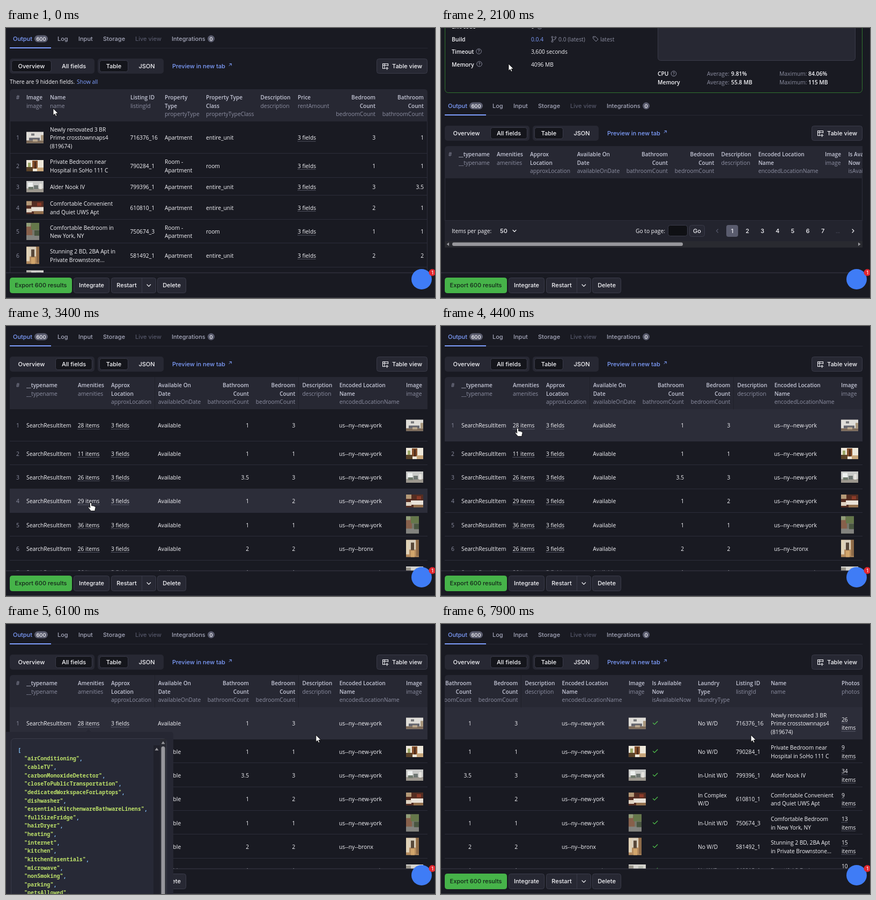
An HTML page for the animation above (8000 ms loop, 800 by 503 pixels).

```html
<!DOCTYPE html>
<html lang="en">
<head>
<meta charset="utf-8">
<title>Dataset table</title>
<style>
  html, body { margin: 0; width: 100%; height: 100%; overflow: hidden; background: #191a22; }
  svg { display: block; width: 800px; height: 503px; }
  text { white-space: pre; }
  .ui { font: 500 11px Inter, sans-serif; }
  .cell { font: 500 10.25px "Open Sans", "Noto Sans", sans-serif; }
  .key { font: 400 10.35px "Open Sans", "Noto Sans", sans-serif; }
  .head { font: 600 10.1px "Open Sans", "Noto Sans", sans-serif; }
  .bold { font: 600 10.3px "Open Sans", "Noto Sans", sans-serif; }
  .code { font: 700 10.08px "Noto Sans Mono", "DejaVu Sans Mono", monospace; }
</style>
</head>
<body>
<svg id="stage" viewBox="0 0 800 503">
  <defs>
    <clipPath id="tableClip"><path d="M7 600V101q0-6 6-6H786V600z"/></clipPath>
    <clipPath id="overviewClip"><path d="M7 600V120q0-6 6-6H780q6 0 6 6V600z"/></clipPath>
    <filter id="soft" x="0" y="0" width="1" height="1"><feGaussianBlur stdDeviation=".7"/></filter>
  </defs>
</svg>
<script>
const C = {
  page: '#191a22', panel: '#272833', line: '#2c2d3a', edge: '#3a3b49', dark: '#14151b',
  white: '#f6f6fa', title: '#c6c8d8', grey: '#8d8fa2', dim: '#555769', badge: '#5a5c6e',
  blue: '#7f9fff', green: '#46b349', hover: '#2c2d39', thumb: '#97979c', code: '#86c8ff'
};
const PERIOD = 8000, LINE = 15.7;
const stage = document.getElementById('stage');

function el(parent, tag, attrs = {}) {
  const node = document.createElementNS('http://www.w3.org/2000/svg', tag);
  for (const key in attrs) node.setAttribute(key, attrs[key]);
  return parent.appendChild(node);
}
const group = (parent, attrs) => el(parent, 'g', attrs);
const rect = (parent, x, y, width, height, fill, rx = 0, stroke = 'none') =>
  el(parent, 'rect', { x, y, width, height, fill, rx, stroke });
const path = (parent, d, stroke, width = 1, fill = 'none') =>
  el(parent, 'path', { d, stroke, fill, 'stroke-width': width, 'stroke-linecap': 'round', 'stroke-linejoin': 'round' });
const circle = (parent, cx, cy, r, fill, stroke = 'none') => el(parent, 'circle', { cx, cy, r, fill, stroke });

// Text is placed by the vertical centre of its capitals.
function label(parent, x, cy, str, cls = 'cell', fill = C.white, anchor = 'start') {
  const node = el(parent, 'text', { x, y: cy + 3.9, class: cls, fill, 'text-anchor': anchor });
  node.textContent = str;
  return node;
}
function lines(parent, x, cy, list, draw = label) {
  list.forEach((str, i) => draw(parent, x, cy + (i - (list.length - 1) / 2) * LINE, str));
}
function link(parent, x, cy, str) {
  const width = label(parent, x, cy, str).getComputedTextLength();
  el(parent, 'path', { d: `M${x} ${cy + 6.5}h${width}`, stroke: '#85879a', 'stroke-dasharray': '1 1' });
}
function header(parent, top, [x, titles, key, anchor]) {
  titles.forEach((str, i) => label(parent, x, top + 15 + i * LINE, str, 'head', C.title, anchor));
  label(parent, x, top + 15 + titles.length * LINE, key, 'key', C.grey, anchor);
}
function button(parent, x, y, w, h, str, fill = C.panel, edge = C.edge, color = C.white) {
  rect(parent, x + .5, y + .5, w - 1, h - 1, fill, 4, edge);
  if (str) label(parent, x + w / 2, y + h / 2, str, 'ui', color, 'middle');
}
function help(parent, x, y) {
  circle(parent, x, y, 4.8, 'none', C.grey);
  el(parent, 'text', { x, y: y + 2.8, 'text-anchor': 'middle', fill: C.grey, style: 'font:600 7.5px Inter,sans-serif' }).textContent = '?';
}

// Thumbnails: [width, height, base colour, ...[x, y, w, h, colour]]
const thumbs = [
  [32, 21, '#dfddd8', [0, 16, 32, 5, '#7d6a58'], [9, 3, 6, 4, '#77787a'], [5, 11, 20, 5, '#63646c'], [12, 14, 9, 4, '#b9a78e'], [27, 6, 5, 10, '#a8967c']],
  [32, 21, '#eee8da', [11, 1, 10, 15, '#84502c'], [0, 13, 12, 8, '#5a4228'], [3, 5, 5, 8, '#9da867'], [20, 14, 12, 7, '#c8a67a'], [15, 3, 3, 13, '#4c2c1c']],
  [32, 21, '#c9cac8', [0, 14, 32, 7, '#9c978e'], [3, 3, 9, 8, '#edf0ef'], [14, 8, 8, 7, '#6f7773'], [24, 5, 5, 10, '#e7e5df'], [4, 11, 9, 5, '#707a6d']],
  [32, 24, '#542d22', [0, 0, 10, 8, '#b59a78'], [9, 11, 23, 8, '#e9e2d8'], [0, 14, 10, 7, '#dfd2c1'], [20, 3, 8, 6, '#8b3a28'], [14, 19, 18, 5, '#93704d']],
  [24, 32, '#75766a', [0, 4, 11, 20, '#87604b'], [9, 0, 15, 13, '#65774a'], [0, 0, 8, 7, '#929e79'], [0, 23, 24, 9, '#83837f'], [15, 14, 9, 10, '#495640']],
  [24, 32, '#b48b5e', [6, 0, 12, 18, '#d9cfbd'], [9, 5, 6, 14, '#58483a'], [0, 0, 6, 27, '#e0d2b7'], [19, 0, 5, 30, '#8d6a48'], [9, 20, 7, 12, '#d2a66c']],
  [32, 21, '#d5d4cf', [0, 2, 9, 12, '#99958c'], [18, 3, 9, 5, '#b9bcb3'], [0, 14, 32, 7, '#8c765e']]
];
function thumb(parent, x, cy, index) {
  const [w, h, base, ...parts] = thumbs[index];
  const g = group(parent, { transform: `translate(${x} ${cy - h / 2 - .5})` });
  rect(g, 0, 0, w, h, base);
  const details = group(g, { filter: 'url(#soft)' });
  parts.forEach(part => rect(details, ...part));
}

const names = [
  ['Newly renovated 3 BR', 'Prime crosstownnaps4', '(819674)'],
  ['Private Bedroom near', 'Hospital in SoHo 111 C'],
  ['Alder Nook IV'],
  ['Comfortable Convenient', 'and Quiet UWS Apt'],
  ['Comfortable Bedroom in', 'New York, NY'],
  ['Stunning 2 BD, 2BA Apt in', 'Private Brownstone...'],
  ['Beautiful 2 Bedroom']
];
const narrowNames = [...names];
narrowNames[4] = ['Comfortable Bedroom', 'in New York, NY'];
narrowNames[5] = ['Stunning 2 BD, 2BA Apt', 'in Private Brownstone...'];
const ids = ['716376_16', '790284_1', '799396_1', '610810_1', '750674_3', '581492_1', '640215_1'];
const beds = [3, 1, 3, 2, 1, 2, 1], baths = [1, 1, 3.5, 1, 1, 2, 1];
const amenities = [28, 11, 26, 29, 36, 26, 26], photos = [26, 9, 34, 9, 13, 15, 10];
const laundry = [['No W/D'], ['No W/D'], ['In-Unit W/D'], ['In Complex', 'W/D'], ['In-Unit W/D'], ['No W/D'], ['No W/D']];
const isRoom = i => i === 1 || i === 4;

// Page content, which scrolls vertically
const page = group(stage);

function buildRunInfo(g) {
  rect(g, 7.5, -200, 778, 195.5, C.page, 6, '#31752f');
  rect(g, 404.5, -200, 368, 135.5, C.panel, 5, C.edge);
  ['Exit code', 'Build', 'Timeout', 'Memory'].forEach((str, i) => label(g, 20, -127.5 + i * 23.5, str, 'bold'));
  label(g, 168, -127.5, '0');
  help(g, 184, -128);
  label(g, 168, -104, '0.0.4', 'cell', C.blue);
  path(g, 'M207.5 -107v6M207.5 -103h4q2 0 2-3', C.grey);
  [[207.5, -108], [207.5, -100], [213.5, -107.5]].forEach(p => circle(g, ...p, 1.5, C.page, C.grey));
  label(g, 219, -104, '0.0 (latest)', 'key', C.grey);
  path(g, 'M284 -109h4l5 5-4 4-5-5zM286 -107h.2', C.grey);
  label(g, 297, -104, 'latest', 'key', C.grey);
  label(g, 168, -81, '3,600 seconds');
  label(g, 168, -57, '4096 MB');
  help(g, 70.5, -81.5);
  help(g, 71.5, -58);
  help(g, 434, -40);
  [['CPU', '9.81%', '84.06%'], ['Memory', '55.8 MB', '115 MB']].forEach(([name, avg, max], i) => {
    const y = -39.5 + i * LINE;
    label(g, 404, y, name, 'bold');
    label(g, 496, y, 'Average:', 'key', C.grey);
    label(g, 541, y, avg, 'bold');
    label(g, 631, y, 'Maximum:', 'key', C.grey);
    label(g, 685, y, max, 'bold');
  });
}

function buildTabs(g) {
  path(g, 'M7 37.5H786', C.panel);
  rect(g, 7, 36, 77, 2, C.blue);
  [[13, 'Output', C.blue], [96, 'Log'], [135, 'Input'], [181, 'Storage'], [241, 'Live view', C.dim], [309, 'Integrations']]
    .forEach(([x, str, fill = '#a6a8bb']) => label(g, x, 20, str, 'ui', fill));
  rect(g, 53, 13.5, 25, 13, C.badge, 6.5);
  rect(g, 376, 13.5, 13, 13, C.badge, 6.5);
  [[65.5, '600'], [382.5, '0']].forEach(([x, str]) =>
    label(g, x, 19.7, str, 'ui', C.white, 'middle').style.fontSize = '9.5px');
}

function buildToolbar(g) {
  rect(g, 7, 57, 158, 28, C.panel, 5);
  rect(g, 171, 57, 123, 28, C.panel, 5);
  const active = rect(g, 10.5, 60.5, 74, 21, C.dark, 4, C.edge);
  rect(g, 174.5, 60.5, 53, 21, C.dark, 4, C.edge);
  [[47.5, 'Overview'], [126.5, 'All fields'], [201, 'Table'], [262.5, 'JSON']]
    .forEach(([x, str]) => label(g, x, 71, str, 'ui', C.white, 'middle'));
  label(g, 310, 71, 'Preview in new tab', 'ui', C.blue);
  path(g, 'M416 70.5l4-4M417 66.5h3.3v3.3', C.blue);
  button(g, 691, 57, 95, 28);
  path(g, 'M707 75.5h-4.5v-9h10v4M702.5 69.5h10M706 66.5v9M710.5 72.5v5M708 75h5', C.white, 1.1);
  label(g, 720, 71, 'Table view', 'ui');
  return active;
}

function buildOverview(g) {
  label(g, 7, 100, 'There are 9 hidden fields.');
  label(g, 132, 100, 'Show all', 'cell', C.blue);
  const t = group(g, { 'clip-path': 'url(#overviewClip)' });
  rect(t, 7, 114, 779, 60, C.panel);
  label(t, 22, 129, '#', 'key', C.grey, 'middle');
  [
    [38, ['Image'], 'image'], [82, ['Name'], 'name'], [232, ['Listing ID'], 'listingId'],
    [296, ['Property', 'Type'], 'propertyType'], [373, ['Property Type', 'Class'], 'propertyTypeClass'],
    [474.5, ['Description'], 'description'], [544, ['Price'], 'rentAmount'],
    [689, ['Bedroom', 'Count'], 'bedroomCount', 'end'], [779, ['Bathroom', 'Count'], 'bathroomCount', 'end']
  ].forEach(col => header(t, 114, col));
  const centres = [204.5, 257, 296, 335, 379.5, 424, 462.5];
  const ends = [233.5, 278.5, 311.5, 356.5, 400.5, 445.5, 479.5];
  centres.forEach((y, i) => {
    path(t, `M7 ${ends[i]}H786`, C.line);
    label(t, 22, y, i + 1, 'key', C.grey, 'middle');
    thumb(t, 38, y, i);
    lines(t, 82, y, names[i]);
    label(t, 231.5, y, ids[i]);
    lines(t, 296, y, isRoom(i) ? ['Room -', 'Apartment'] : ['Apartment']);
    label(t, 373, y, isRoom(i) ? 'room' : 'entire_unit');
    link(t, 544, y, '3 fields');
    label(t, 689, y, beds[i], 'cell', C.white, 'end');
    label(t, 779, y, baths[i], 'cell', C.white, 'end');
  });
  path(t, 'M7.5 174V460M785.5 174V460', C.line);
}

const columns = [
  [134, ['Amenities'], 'amenities'], [196, ['Approx', 'Location'], 'approxLocation'],
  [283.7, ['Available On', 'Date'], 'availableOnDate'], [453, ['Bathroom', 'Count'], 'bathroomCount', 'end'],
  [539.5, ['Bedroom', 'Count'], 'bedroomCount', 'end'], [552.5, ['Description'], 'description'],
  [621.7, ['Encoded Location', 'Name'], 'encodedLocationName'], [746, ['Image'], 'image'],
  [789.5, ['Is Available', 'Now'], 'isAvailableNow'], [875, ['Laundry', 'Type'], 'laundryType'],
  [946, ['Listing ID'], 'listingId'], [1011, ['Name'], 'name'], [1143, ['Photos'], 'photos']
];

function buildLoading(g) {
  const t = group(g, { 'clip-path': 'url(#tableClip)' });
  rect(t, 7, 95, 779, 60, C.panel);
  label(t, 17, 110, '#', 'key', C.grey, 'middle');
  header(t, 95, [33, ['__typename'], '__typename']);
  columns.forEach(([x, ...rest]) => header(t, 95, [x - 30, ...rest]));
  rect(g, 7, 233, 779, 39, '#23242e');
  path(g, 'M7 233.5H786M7.5 155V233M785.5 155V233', C.line);
  label(g, 20, 253, 'Items per page:');
  label(g, 110, 253, '50', 'ui');
  path(g, 'M134 251.5l3 3 3-3', C.white, 1.2);
  label(g, 363, 253, 'Go to page:');
  rect(g, 423.5, 242.5, 36, 20, '#0f1014', 4, C.edge);
  button(g, 463, 242, 29, 22, 'Go');
  path(g, 'M516.5 250l-3 3 3 3', C.dim, 1.2);
  rect(g, 532, 242, 22, 22, C.badge, 4);
  for (let n = 1; n <= 7; n++) label(g, 515 + n * 28.15, 253, n, 'ui', C.white, 'middle');
  label(g, 740, 253, '...', 'cell', C.dim, 'middle');
  path(g, 'M767 250l3 3-3 3', C.white, 1.2);
  rect(g, 7, 272, 779, 12, '#292a30');
  rect(g, 21, 274.5, 430, 6.5, C.thumb, 3);
  path(g, 'M15 274.5v6.5l-4.5-3.2z', 'none', 0, C.thumb);
  path(g, 'M778 274.5v6.5l4.5-3.2z', 'none', 0, C.thumb);
}

const rowEdges = [155, 215, 259, 304, 348, 392, 437, 481];
const rowCentres = [185.5, 238, 282, 326.5, 371, 415, 459];

function buildFull(g) {
  const t = group(g, { 'clip-path': 'url(#tableClip)' });
  rect(t, 7, 95, 779, 60, C.panel);
  const hover = rect(t, 7, 0, 779, 0, C.hover);
  rowEdges.slice(1).forEach(y => path(t, `M7 ${y - .5}H786`, C.line));
  const wide = group(t);
  path(wide, 'M277.5 95V155M545.5 95V155', '#20212a');
  label(wide, 22, 110, '#', 'key', C.grey, 'middle');
  header(wide, 95, [38, ['__typename'], '__typename']);
  columns.forEach(col => header(wide, 95, col));
  rowCentres.forEach((y, i) => {
    label(wide, 22, y, i + 1, 'key', C.grey, 'middle');
    label(wide, 38, y, 'SearchResultItem');
    link(wide, 133.7, y, amenities[i] + ' items');
    link(wide, 196, y, '3 fields');
    label(wide, 283.3, y, 'Available');
    label(wide, 453, y, baths[i], 'cell', C.white, 'end');
    label(wide, 539.3, y, beds[i], 'cell', C.white, 'end');
    label(wide, 621, y, i === 5 ? 'us--ny--bronx' : 'us--ny--new-york');
    thumb(wide, 746, y, i);
    path(wide, `M791.5 ${y - 1}l2.7 2.6 5.6-5.6`, '#4fc04c', 1.3);
    lines(wide, 875, y, laundry[i]);
    label(wide, 946, y, ids[i]);
    lines(wide, 1011, y, narrowNames[i]);
    lines(wide, 1143, y, [String(photos[i]), 'items'], link);
  });
  return { wide, hover };
}

function buildFooter(g) {
  rect(g, 0, 456, 800, 47, C.page);
  path(g, 'M0 456H800', C.edge);
  path(g, 'M0 502.5H800', '#3b3c44');
  button(g, 7, 465, 116, 29, 'Export 600 results', C.green, C.green, '#14231a');
  button(g, 126, 465, 67, 29, 'Integrate');
  button(g, 196, 465, 84, 29);
  label(g, 225, 479.5, 'Restart', 'ui', C.white, 'middle');
  path(g, 'M253.5 465.5v28', C.edge);
  path(g, 'M263 478l3.3 3.3 3.3-3.3', C.white, 1.2);
  button(g, 282, 465, 54, 29, 'Delete');
}

function buildPopup(g) {
  path(g, 'M0 201H149l5-5 5 5H307q5 0 5 5V503H0z', 'none', 0, '#262733');
  rect(g, 9.5, 213.5, 290, 320, '#272936', 6, C.edge);
  rect(g, 275, 226, 12, 280, '#20212b');
  rect(g, 287, 214, 12, 290, '#292a32');
  rect(g, 289.5, 228, 7, 300, C.thumb, 3.5);
  path(g, 'M289.5 223.5h7l-3.5-5z', 'none', 0, C.thumb);
  path(g, 'M277.5 235.5h7l-3.5-5z', 'none', 0, C.thumb);
  label(g, 22, 235, '[', 'code', C.code);
  ('airConditioning cableTV carbonMonoxideDetector closeToPublicTransportation dedicatedWorkspaceForLaptops ' +
   'dishwasher essentialsKitchenwareBathwareLinens fullSizeFridge hairDryer heating internet kitchen ' +
   'kitchenEssentials microwave nonSmoking parking petsAllowed').split(' ').forEach((word, i) => {
    const node = label(g, 34, 250.5 + i * 15.63, `"${word}"`, 'code', '#bce069');
    el(node, 'tspan', { fill: C.code }).textContent = ',';
  });
}

buildRunInfo(page);
buildTabs(page);
const activeTab = buildToolbar(page);
const overview = group(page), loading = group(page), full = group(page);
buildOverview(overview);
buildLoading(loading);
const table = buildFull(full);
buildFooter(group(stage));
const popup = group(stage);
buildPopup(popup);

circle(stage, 775, 468, 19, '#3f7cf6');
circle(stage, 795, 455.5, 6.5, '#e0262e');
label(stage, 795, 455.3, '1', 'ui', '#fff', 'middle').style.fontSize = '9px';

const arrow = group(stage), hand = group(stage);
path(arrow, 'M0 0V12.6L2.9 9.9 4.9 14.3 7 13.4 5 9.1H9z', '#000', .8, '#fff');
path(hand, 'M-1.5 1.2q1.5-2 3 0V6l1-.6 1.5.9 1.5-.3 1.2 1 1.6.2q.8.8.7 2.4l-1 3.4V15.5H.5L-4 10.2q-1.3-2.2.5-2.3l2 1.6z', '#000', .8, '#fff');

// Motion
const CLICK = 1400, LOADED = 2300, OPEN = 4500, CLOSE = 6200;
const ease = p => p * p * (3 - 2 * p);
const progress = (t, a, b) => Math.min(1, Math.max(0, (t - a) / (b - a)));
const route = [
  [0, 88, 150], [800, 126, 67], [2600, 126, 67], [3300, 158, 329],
  [3600, 158, 329], [4300, 143, 190], [4800, 143, 190], [5700, 578, 207], [PERIOD, 578, 207]
];
function pointer(t) {
  const i = route.findIndex(stop => stop[0] > t);
  const [t0, x0, y0] = route[i - 1], [t1, x1, y1] = route[i];
  const p = ease(progress(t, t0, t1));
  return [x0 + (x1 - x0) * p, y0 + (y1 - y0) * p];
}
const show = (node, on) => node.setAttribute('display', on ? 'inline' : 'none');
const move = (node, x, y) => node.setAttribute('transform', `translate(${x} ${y})`);

function render(t) {
  const isFull = t >= LOADED, [x, y] = pointer(t);
  const dy = t < CLICK ? 0 : 125 * (1 - ease(progress(t, 2350, 2750)));
  move(page, 0, dy);
  show(overview, t < CLICK);
  show(loading, t >= CLICK && !isFull);
  show(full, isFull);
  activeTab.setAttribute('x', t < CLICK ? 10.5 : 92.5);
  activeTab.setAttribute('width', t < CLICK ? 74 : 68);
  move(table.wide, -Math.max(0, (t - 6585) * .3012), 0);

  const row = isFull ? rowCentres.findIndex((_, i) => y - dy >= rowEdges[i] && y - dy < rowEdges[i + 1]) : -1;
  show(table.hover, row >= 0);
  if (row >= 0) {
    table.hover.setAttribute('y', rowEdges[row]);
    table.hover.setAttribute('height', rowEdges[row + 1] - rowEdges[row]);
  }
  show(popup, t >= OPEN && t < CLOSE);

  const onLink = row >= 0 && x > 132 && x < 176 && Math.abs(y - dy - rowCentres[row]) < 8;
  show(arrow, !onLink);
  show(hand, onLink);
  move(onLink ? hand : arrow, x, y);
}

const start = performance.now();
function tick() {
  const t = (performance.now() - start) % PERIOD;
  render(Math.floor(t / 100) * 100);
  requestAnimationFrame(tick);
}
tick();
</script>
</body>
</html>
```
